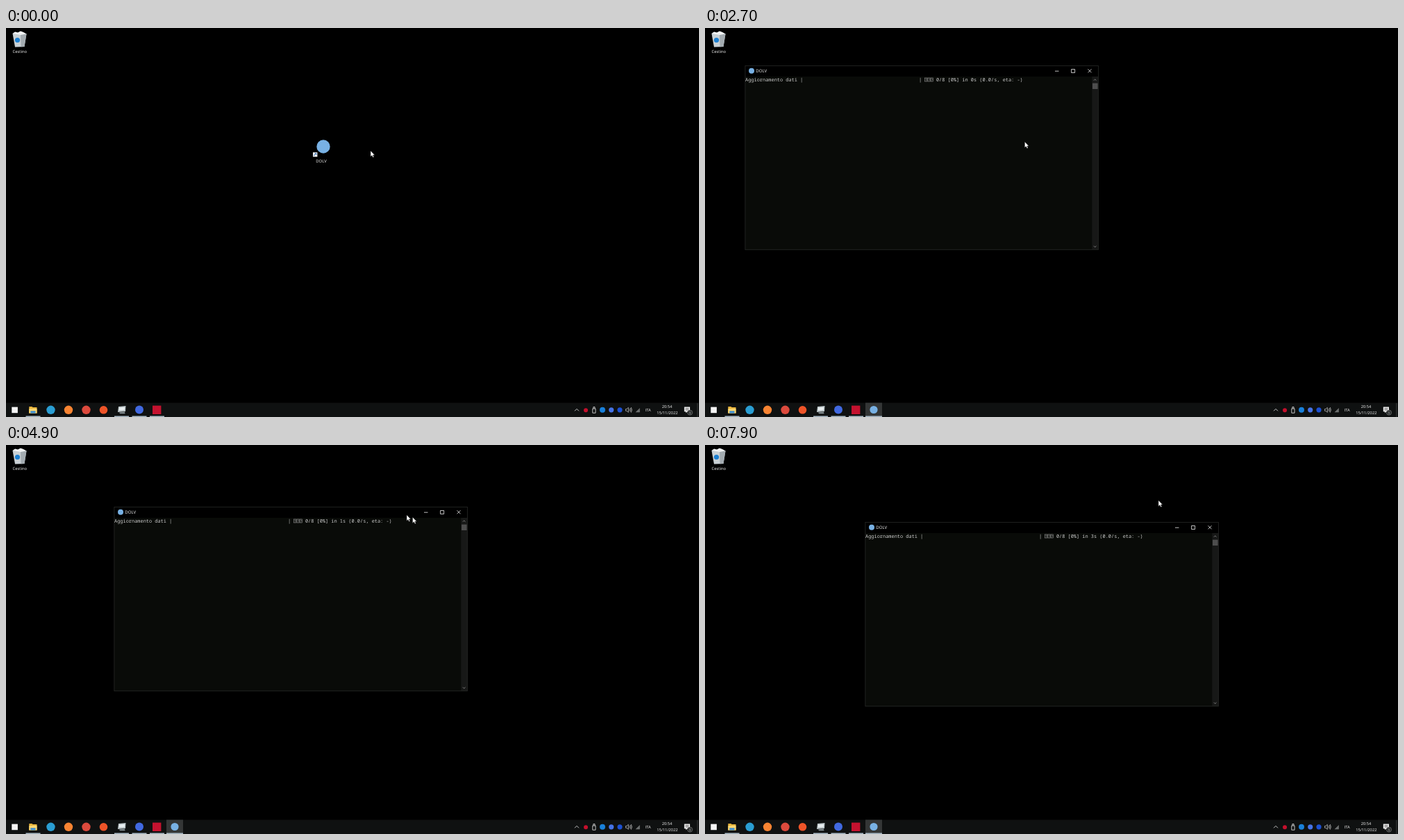
An HTML page that plays this animation: 998 px wide and 561 px high, repeating every 8 s.

```html
<!DOCTYPE html>
<html lang="it">
<head>
<meta charset="utf-8">
<title>Desktop</title>
<style>
  html, body { margin: 0; width: 100%; height: 100%; overflow: hidden; background: #000; }
  svg { display: block; width: 100vw; height: 100vh; }
  text { font: 5.9px "Open Sans", "Noto Sans", sans-serif; fill: #f4f4f4; text-rendering: geometricPrecision; }
  .mid { text-anchor: middle; }
  .clock { font-size: 5.7px; }
  .title { font-size: 6.1px; }
  .mono { font: 6.94px "Noto Sans Mono", "DejaVu Sans Mono", monospace; fill: #ccc; white-space: pre; }
  .line { fill: none; stroke: #eee; stroke-width: .8; }
  .thin { fill: none; stroke: #aaa; stroke-width: .7; }
</style>
</head>
<body>
<svg viewBox="0 0 998 561">
  <defs>
    <path id="arrow" d="M0 0V8.6L2 6.8 3.4 9.8 4.8 9.1 3.5 6.2H6Z" fill="#fff" stroke="#000" stroke-width=".4"/>
    <g id="tofu" fill="none" stroke="#b4b4b4" stroke-width=".5">
      <rect x=".4" y="18" width="3.4" height="5"/>
      <path d="M1.3 19.7Q2.1 18.8 2.8 19.6T2.1 21V21.4M2.1 21.9V22.4"/>
    </g>
    <rect id="half" y="20" width="4.17" height="4.3" fill="#ccc"/>
    <rect id="full" y="16" width="4.17" height="8.3" fill="#ccc"/>
  </defs>
  <rect width="998" height="561"/>

  <!-- recycle bin -->
  <path d="M9.5 8L29.5 8.5 26.5 27 13 27.5Z" fill="#c9d0d4"/>
  <path d="M21 9L29.5 8.5 26.5 27 21.5 27.3Z" fill="#a3abb0"/>
  <path d="M9.5 8L13 5.5 17 6.5 21 4.5 25 6 29.5 8.5 21 10Z" fill="#f1f3f4"/>
  <circle cx="16.5" cy="17.5" r="3.6" fill="#1c7fd0"/>
  <text class="mid" x="19.8" y="36.2">Cestino</text>

  <!-- shortcut -->
  <rect id="hover" x="435" y="160.5" width="38.5" height="35" fill="#161d20" stroke="#566166" stroke-width=".8"/>
  <circle id="app" cx="457" cy="171" r="9.7" fill="#78b1e4"/>
  <rect x="442" y="179.3" width="6.4" height="6.4" fill="#f2f2f2"/>
  <path d="M443.6 184.5Q443.8 181.9 446 181.6M444.7 180.8H446.9V183" fill="none" stroke="#1c5fae" stroke-width=".9"/>
  <text class="mid" x="454" y="193.6">DOLV</text>

  <!-- taskbar -->
  <rect y="540.5" width="998" height="20.5" fill="#0f1111"/>
  <rect x="8.3" y="546.6" width="8.6" height="8.6" fill="#f5f5f5"/>
  <path d="M33.3 546H37.5L38.5 547H44.5V555.5H33.3Z" fill="#e9b53c"/>
  <path d="M33.3 549H44.5V555.5H33.3Z" fill="#fbd873"/>
  <path d="M35.3 552.3H42.5V555.5H35.3Z" fill="#3d8fd3"/>
  <circle cx="64.5" cy="550.8" r="6.2" fill="#2a9ed3"/>
  <circle cx="90" cy="550.8" r="6.2" fill="#f98432"/>
  <circle cx="115.5" cy="550.8" r="6.2" fill="#dc4a3d"/>
  <circle cx="140.5" cy="550.8" r="5.8" fill="#ee5428"/>
  <path d="M162 546L172.5 545 172 553 161 554Z" fill="#b9c3c6"/>
  <path d="M163 547.5L171 546.8 170.7 551 162.6 551.8Z" fill="#e9eef0"/>
  <path d="M163 554.5L171 553.5 171.5 556.3H164Z" fill="#7f898d"/>
  <circle cx="192" cy="550.6" r="6" fill="#4169e1"/>
  <rect x="211" y="544.6" width="12.4" height="12.4" fill="#c4122f"/>
  <g id="task">
    <rect x="231" y="540.5" width="24" height="20.5" fill="#343636"/>
    <circle id="taskIcon" cx="243" cy="550.5" r="5.6" fill="#78b1e4"/>
    <rect x="231" y="559.5" width="24" height="1.5" fill="#a9bac6"/>
  </g>
  <path d="M28.5 560.2H49.5M156 560.2H177M181.5 560.2H202.5M207 560.2H228" stroke="#a9bac6" stroke-width="1.5"/>

  <!-- tray -->
  <path class="line" d="M819 552.3L822 549.3 825 552.3"/>
  <circle cx="835" cy="551.3" r="3" fill="#c5102c"/>
  <path class="line" d="M844.8 549H849V555.2H844.8ZM845.8 549V546.6H848V549"/>
  <circle cx="859" cy="550.8" r="4" fill="#1980da"/>
  <circle cx="871.7" cy="550.8" r="3.6" fill="#4673e6"/>
  <circle cx="884" cy="550.8" r="3.6" fill="#1c50d2"/>
  <path class="line" d="M892.5 549.5H894L896.3 547.3V554.3L894 552.2H892.5ZM897.7 549.3Q898.7 550.8 897.7 552.3M899 548Q901 550.8 899 553.6M900.3 547Q902.4 550.8 900.3 554.6" style="stroke-width:.6"/>
  <path d="M906.5 554.3L912.8 548V554.3Z" fill="#6c6f6f"/>
  <text class="mid clock" x="924.7" y="553">ITA</text>
  <text class="mid clock" x="952" y="548.2">20:54</text>
  <text class="mid clock" x="952.3" y="557.4">15/11/2022</text>
  <path d="M976.8 546.5H985V553.3H981L979 555.3V553.3H976.8Z" fill="#f1f1f1"/>
  <path d="M978.3 548.7H983.5M978.3 550.8H983.5" stroke="#222" stroke-width=".7"/>
  <circle cx="985" cy="554.6" r="3.6" fill="#2b2e2e" stroke="#999" stroke-width=".5"/>
  <text class="mid" x="985" y="556.6" style="font-size:5px">1</text>
  <path d="M995.8 541V561" stroke="#4d5050" stroke-width=".7"/>

  <!-- console -->
  <g id="win">
    <rect width="508.5" height="265.5" y=".5" fill="#000"/>
    <rect y="16" width="508.5" height="250" fill="#090b08"/>
    <circle cx="9" cy="7.7" r="4" fill="#78b1e4"/>
    <text class="title" x="15.3" y="10.1">DOLV</text>
    <path class="line" d="M446 8.2H451.5M469.6 5.5H474.6V10.5H469.6ZM493.5 5.3L498.5 10.3M498.5 5.3L493.5 10.3"/>
    <rect x="499.3" y="16" width="8.8" height="249.5" fill="#171817"/>
    <rect x="500" y="25.6" width="7.6" height="8.4" fill="#4d4d4d"/>
    <path class="thin" d="M501.9 21.7L503.7 19.9 505.5 21.7M501.9 260.3L503.7 262.1 505.5 260.3"/>
    <rect x="-.1" y=".6" width="508.5" height="265.2" fill="none" stroke="#2c2e2c" stroke-width=".7"/>
    <rect id="caret" y="22.8" width="4.2" height="1.7" fill="#ccc"/>
    <g id="progress">
      <text class="mono" x="0" y="22.7">Aggiornamento dati |</text>
      <text class="mono" x="249.9" y="22.7">|</text>
      <use id="s0" x="258.2"/><use id="s1" x="262.4"/><use id="s2" x="266.6"/>
      <text class="mono" id="stats" x="274.9" y="22.7"></text>
    </g>
  </g>
  <use id="ghost" href="#arrow"/>
  <use id="mouse" href="#arrow"/>
</svg>
<script>
const $ = id => document.getElementById(id);
const LOOP = 8000, STEP = 100;

// [time, x, y]
const mousePath = [
  [0, 525, 177], [200, 520, 177], [500, 496, 176], [800, 473, 173], [900, 469.5, 171.5],
  [1000, 463, 168.5], [1100, 459.8, 170], [2600, 459.8, 170], [2800, 461, 158],
  [3200, 467, 108], [3500, 471, 80.5], [3600, 475, 73], [3700, 478, 68], [3800, 479, 65.8],
  [5500, 479, 65.8], [5800, 479.6, 65.8], [5900, 480, 54], [6000, 480, 38.8], [6100, 480, 27], [6200, 480, 22.8]
];
const dragPath = [
  [4300, 0, 0], [4400, 4, 1], [4500, 16, 5], [4700, 53, 17.5], [4800, 75, 25],
  [4900, 98, 35], [5100, 132, 48], [5200, 141, 51.2], [5300, 144, 52], [5400, 163, 56], [5500, 173, 57]
];
// [time, scale, opacity]
const openPath = [[1700, .93, 0], [1800, .94, .04], [1900, .965, .27], [2000, .986, .7], [2100, .996, .93], [2200, 1, 1]];
// T: missing glyph, H: half block, F: full block
const spinner = [
  [2700, "TTT"], [3100, "HTT"], [3200, "TTT"], [3400, "THT"], [3500, "TTT"], [3600, "FTH"], [3700, "TTT"],
  [4000, "THT"], [4100, "TTT"], [4800, "HTF"], [4900, "TTT"], [5200, "THT"], [5300, "TTT"], [5500, "FTH"],
  [5700, "TTT"], [5900, "TFT"], [6000, "TTT"], [6100, "TTH"], [6200, "TTT"], [6500, "THT"], [6700, "HTT"],
  [6800, "TTT"], [7000, "HTH"], [7100, "TTT"], [7400, "THT"], [7500, "TTH"], [7600, "TTT"], [7800, "FTH"], [7900, "TTT"]
];
const glyph = { T: "#tofu", H: "#half", F: "#full" };

function along(path, t) {
  const i = path.findIndex(p => p[0] > t);
  if (i === 0) return path[0].slice(1);
  if (i < 0) return path[path.length - 1].slice(1);
  const a = path[i - 1], b = path[i], k = (t - a[0]) / (b[0] - a[0]);
  return [a[1] + (b[1] - a[1]) * k, a[2] + (b[2] - a[2]) * k];
}
const show = (id, on) => $(id).setAttribute("visibility", on ? "inherit" : "hidden");
const move = (id, x, y) => $(id).setAttribute("transform", `translate(${x} ${y})`);

function draw(t) {
  const [mx, my] = along(mousePath, t), [dx, dy] = along(dragPath, t);
  const [lx, ly] = along(dragPath, t + STEP / 2);
  move("mouse", mx + lx, my + ly);
  move("ghost", mx + dx, my + dy);
  show("ghost", t >= 4400 && t < 5500);
  show("hover", t >= 800);
  $("app").setAttribute("opacity", t < 1500 ? 1 : .9);

  const [scale, alpha] = along(openPath, t);
  $("win").setAttribute("transform",
    `translate(${58 + dx} ${54 + dy}) translate(254 133) scale(${scale}) translate(-254 -133)`);
  $("win").setAttribute("opacity", alpha);
  $("task").setAttribute("opacity", t < 1800 ? 0 : t < 1900 ? .4 : 1);
  $("taskIcon").setAttribute("opacity", Math.min(1, alpha + .1));
  show("caret", t < 2300);

  show("progress", t >= 2700);
  const secs = Math.max(0, Math.floor((t - 1900) / 1600));
  $("stats").textContent = `0/8 [0%] in ${secs}s (0.0/s, eta: -)`;
  const state = (spinner.filter(s => s[0] <= t).pop() || spinner[0])[1];
  [...state].forEach((c, i) => $("s" + i).setAttribute("href", glyph[c]));
}

const start = performance.now();
function tick() {
  const t = (performance.now() - start) % LOOP;
  draw(Math.floor(t / STEP) * STEP);
  requestAnimationFrame(tick);
}
tick();
</script>
</body>
</html>
```
